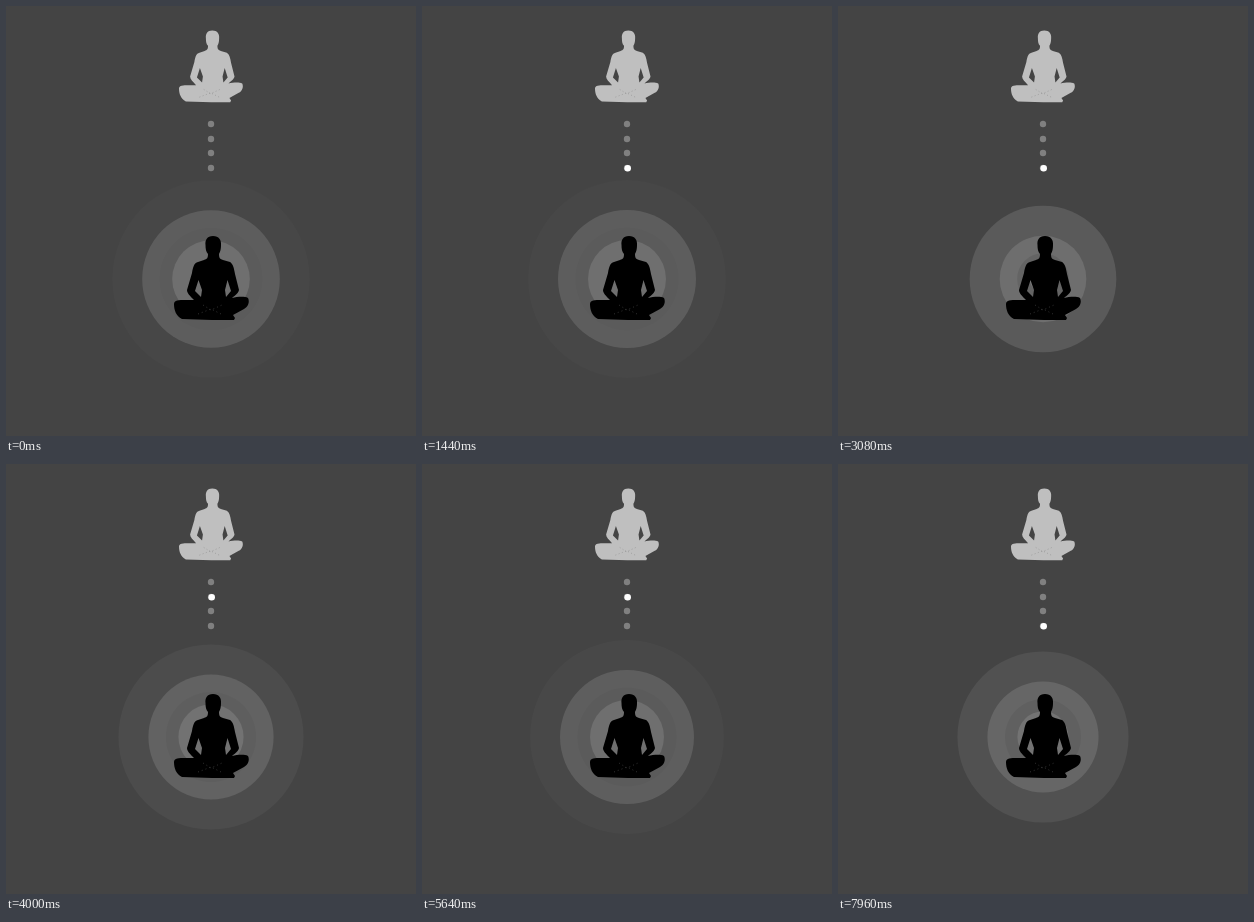
Recreate the animation shown at these times as an HTML page. Size 410 px wide and 430 px high, loop 8000 ms.

```html
<!DOCTYPE html>
<html lang="en">
<head>
<meta charset="utf-8">
<title>Breathing</title>
<style>
  html, body { margin: 0; width: 100%; height: 100%; overflow: hidden; background: #444; }
  svg { display: block; width: 410px; height: 430px; }
</style>
</head>
<body>
<svg viewBox="0 0 410 430">
  <defs>
    <g id="figure">
      <path fill-rule="evenodd" d="
        M39 0 C45 0 47.5 4 47 9 C47 14 46 16 45 18 C45 22 46 23 49 24
        L56 26 C59 28 60 32 61 38 L65 54 C64 58 60 60 58 62
        C63 61 70 60 74 62 C76 66 74 71 70 73 L59 79 L61 82 L60 84
        L38 84 L8 83 C2 80 0 74 0 68 C0 64 5 64 11 64
        L20 64 C16 60 13 57 13 54 L18 37 C19 31 20 27 24 26
        L30 24 C33 23 34 22 34 18 C32 16 31.500 13 31.500 9 C31 4 33 0 39 0 Z
        M24.500 44 L21 55 L27 61 L28 54 Z
        M53.500 44 L51 54 L52 61 L57 55 Z"/>
      <path d="M29 69 L37 74 L48 69 M24 78 L37 73 L49 79" fill="none"
            stroke="#666" stroke-opacity=".55" stroke-width=".9" stroke-dasharray="1 3"/>
    </g>
  </defs>
  <rect width="410" height="430" fill="#444"/>
  <g id="rings"></g>
  <use href="#figure" transform="translate(173 24.500) scale(.854)" fill="#bfbfbf"/>
  <use href="#figure" transform="translate(168 230)"/>
  <g id="dots"></g>
</svg>
<script>
const LOOP = 8000;
const RIPPLE = 1432, GAP = 30, START = 43;      // each ring travels one gap per ripple
const DOT_SLOT = 400, DOT_CYCLE = 1640, FADE = 80;

function circle(parentId, cx, cy, r, fill) {
  const node = document.createElementNS('http://www.w3.org/2000/svg', 'circle');
  const set = (name, value) => node.setAttribute(name, value);
  Object.entries({ cx, cy, r, fill }).forEach(([name, value]) => set(name, value));
  document.getElementById(parentId).append(node);
  return set;
}

const ring = fill => circle('rings', 205, 273, 0, fill);
const outer = ring('#fff'), middle = ring('#fff'), shade = ring('#000'), inner = ring('#fff');

const dotRows = [118, 133, 147, 162];
dotRows.forEach(y => circle('dots', 205, y, 3.2, '#808080'));
const lights = dotRows.map(y => circle('dots', 205.7, y + .3, 3.3, '#fff'));

const clamp = x => Math.max(0, Math.min(1, x));

function draw(t) {
  const phase = (t / RIPPLE + (68.8 - START) / GAP) % 1;
  const radius = START + GAP * phase;
  outer('r', radius + GAP);
  outer('opacity', .12 * (1 - phase));
  middle('r', radius);
  middle('opacity', .12);
  shade('r', radius - 17.5);
  shade('opacity', .09 * (1 - phase) + .015 * phase);
  inner('r', radius - GAP);
  inner('opacity', .12);

  lights.forEach((light, i) => {
    const local = t % DOT_CYCLE - i * DOT_SLOT;
    light('opacity', clamp(Math.min(local, DOT_SLOT - local) / FADE));
  });
}

const begin = performance.now();
function tick() {
  draw((performance.now() - begin) % LOOP);
  requestAnimationFrame(tick);
}
tick();
</script>
</body>
</html>
```
